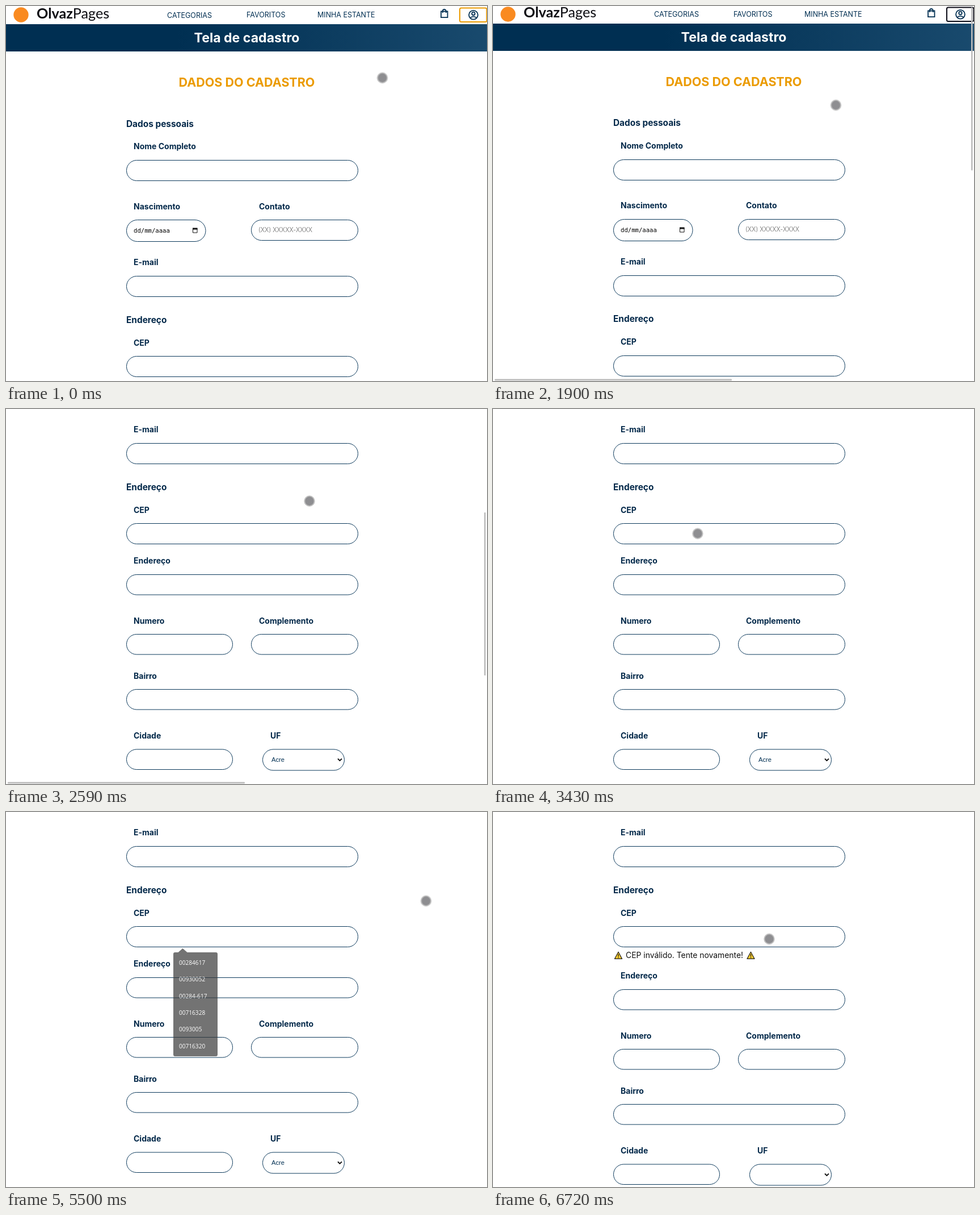
An HTML page that plays this animation: 848x660 px, repeating every 8000 ms.

```html
<!DOCTYPE html>
<html lang="pt-BR">
<head>
<meta charset="utf-8">
<title>Tela de cadastro</title>
<style>
  html, body { margin: 0; width: 100%; height: 100%; overflow: hidden; background: #fff; }
  svg { display: block; width: 848px; height: 660px; font-family: Inter, sans-serif; fill: #002f52; }

  .brand { font: 25.2px Lato, sans-serif; fill: #0d0d12; }
  .brand .bold { font-weight: 700; }
  .nav { font-size: 12.5px; font-weight: 400; }
  .banner { font-size: 23.1px; font-weight: 700; fill: #fff; text-anchor: middle; }
  .title { font-size: 21.5px; font-weight: 700; fill: #eb9b00; text-anchor: middle; }
  .section { font-size: 15.4px; font-weight: 700; fill: #04294a; }
  .label { font-size: 14px; font-weight: 700; fill: #04294a; }
  .hint { font-size: 11px; font-weight: 300; fill: #666; }
  .date { font: 10.6px "DejaVu Sans Mono", monospace; fill: #000; }
  .option { font: 11.2px "Liberation Sans", Arial, sans-serif; }
  .notice { font-size: 13.9px; font-weight: 400; fill: #111; }
  .item { font-size: 14.2px; font-weight: 300; }
  .item.on { font-size: 13.4px; font-weight: 700; fill: #eb9b00; }
  .tips { font: 10.1px "Open Sans", sans-serif; fill: #fff; }
  .field { fill: #fff; stroke: #0d3a5c; }
  .line { fill: none; stroke: #002f52; stroke-width: 1.8; }
  .bar { fill: #bcbcbc; }

  /* every animation shares one 8 s timeline */
  .page, .bar, .frame, .account, .menu, .lower, .notice-row, .acre, .popup, .cursor, .dot {
    animation: 8s linear infinite;
  }
  .frame, .account, .menu, .lower, .notice-row, .acre, .dot { animation-timing-function: step-end; }

  .page { animation-name: scroll; }
  @keyframes scroll {
    0%, 23.6% { transform: translateY(0); }
    23.75% { transform: translateY(-1px); animation-timing-function: cubic-bezier(.3, 0, .5, 1); }
    30.5%, 100% { transform: translateY(-415px); }
  }

  .bar.v { animation-name: thumb; }
  @keyframes thumb {
    0%, 10.8% { transform: translateY(0); opacity: 0; }
    10.87%, 23.75% { transform: translateY(0); opacity: 1; }
    23.75% { animation-timing-function: cubic-bezier(.3, 0, .5, 1); }
    30.5%, 35% { transform: translateY(180px); opacity: 1; }
    37.5%, 100% { transform: translateY(180px); opacity: 0; }
  }
  .bar.h { animation-name: track; }
  @keyframes track {
    0%, 10.8% { opacity: 0; }
    10.87% { opacity: 1; }
    12.6%, 23.6% { opacity: 0; }
    23.7%, 35% { opacity: 1; }
    37.5%, 100% { opacity: 0; }
  }

  .frame { animation-name: frame; }
  @keyframes frame {
    0% { fill: #fff; stroke: #eb9b00; }
    10.875% { fill: #002f52; stroke: #06101c; }
    17.625%, 100% { fill: #fff; stroke: #0b0b16; }
  }
  .account { animation-name: account; }
  @keyframes account {
    0% { stroke: #002f52; }
    10.875% { stroke: #fff; }
    17.625%, 100% { stroke: #002f52; }
  }
  .menu { animation-name: menu; }
  @keyframes menu {
    0% { visibility: hidden; }
    10.875% { visibility: visible; }
    17.625%, 100% { visibility: hidden; }
  }

  .lower { animation-name: lower; }
  @keyframes lower {
    0% { transform: translateY(0); }
    76.375%, 100% { transform: translateY(21px); }
  }
  .notice-row { animation-name: show; }
  @keyframes show {
    0% { visibility: hidden; }
    76.375%, 100% { visibility: visible; }
  }
  .acre { animation-name: hide; }
  @keyframes hide {
    0% { visibility: visible; }
    76.375%, 100% { visibility: hidden; }
  }

  .popup { animation-name: popup; }
  @keyframes popup {
    0%, 60.3% { opacity: 0; }
    61.9%, 67.8% { opacity: 1; }
    68.75% { opacity: .72; }
    70.3%, 100% { opacity: 0; }
  }

  .cursor { animation-name: move; animation-timing-function: ease-in-out; }
  @keyframes move {
    0% { transform: translate(663.5px, 126.5px); }
    8.25%, 17.5% { transform: translate(816px, 21px); }
    23.75% { transform: translate(604.5px, 174.5px); }
    32.375% { transform: translate(535px, 162px); animation-timing-function: ease-in; }
    37.75% { transform: translate(430px, 191px); animation-timing-function: ease-out; }
    43.625%, 61.125% { transform: translate(359px, 220px); }
    64.625%, 75.5% { transform: translate(740.5px, 156.5px); }
    84%, 100% { transform: translate(487px, 223.5px); }
  }
  .dot { stroke-width: 1.8; animation-name: press; }
  @keyframes press {
    0%, 11.75%, 17.625%, 61.125%, 67.875%, 100% {
      fill: rgba(50, 50, 54, .55); stroke: rgba(90, 90, 90, .38);
    }
    10%, 16.75%, 59.5%, 67% {
      fill: rgba(170, 165, 0, .7); stroke: rgba(220, 215, 20, .8);
    }
  }
</style>
</head>
<body>
<svg viewBox="0 0 848 660">
  <defs>
    <linearGradient id="sea" gradientUnits="userSpaceOnUse" x1="301" y1="0" x2="1402" y2="0">
      <stop offset="0" stop-color="#002f52"/>
      <stop offset="1" stop-color="#326589"/>
    </linearGradient>
    <g id="warn">
      <path d="M7.5 1.2 14 13.4H1Z" fill="#fccf2e" stroke="#26221c" stroke-width="1.2" stroke-linejoin="round"/>
      <path d="M7.5 5v4.4M7.5 10.6v1.4" stroke="#26221c" stroke-width="1.4"/>
    </g>
  </defs>

  <g class="page">
    <!-- header -->
    <circle cx="26.5" cy="15.5" r="13.2" fill="#f98a20"/>
    <text class="brand" x="54" y="21.5"><tspan class="bold">Olvaz</tspan>Pages</text>
    <g class="nav">
      <text x="284" y="20.5">CATEGORIAS</text>
      <text x="424" y="20">FAVORITOS</text>
      <text x="549" y="20">MINHA ESTANTE</text>
    </g>
    <path class="line" d="M767 9.5h11.5v10.7h-11.5zM769.8 12V9a3 3 0 0 1 6 0v3"/>
    <rect class="frame" x="800" y="3.5" width="47.5" height="24.5" rx="2.5" stroke-width="2"/>
    <g class="line account">
      <circle cx="824" cy="15.7" r="7.9"/>
      <circle cx="824" cy="13.4" r="2.7"/>
      <path d="M818.4 21c3-3.2 8.2-3.2 11.2 0"/>
    </g>
    <rect y="32" width="848" height="48" fill="url(#sea)"/>
    <text class="banner" x="424.5" y="64">Tela de cadastro</text>
    <g class="menu">
      <rect x="730" y="32" width="118" height="160" fill="#fff"/>
      <text class="item on" x="743" y="56.5">Meu Perfil</text>
      <text class="item" x="743" y="96.5">Minha conta</text>
      <text class="item" x="743" y="136.5">Meus pedidos</text>
      <text class="item" x="743" y="176">Sair</text>
    </g>

    <!-- personal data -->
    <text class="title" x="424.5" y="142">DADOS DO CADASTRO</text>
    <text class="section" x="212" y="212.5">Dados pessoais</text>
    <text class="label" x="225" y="252">Nome Completo</text>
    <rect class="field" x="212.5" y="271.5" width="408" height="36" rx="18"/>
    <text class="label" x="225" y="357.5">Nascimento</text>
    <rect class="field" x="212.5" y="376.5" width="139.5" height="38" rx="19"/>
    <text class="date" x="225" y="399">dd/mm/aaaa</text>
    <path d="M329.5 391.5h7.5v7.5h-7.5z" fill="none" stroke="#111"/>
    <path d="M329 390.5h8.5v3h-8.5z" fill="#111"/>
    <text class="label" x="446" y="357.5">Contato</text>
    <rect class="field" x="432.5" y="376.5" width="188" height="36" rx="18"/>
    <text class="hint" x="445" y="398">(XX) XXXXX-XXXX</text>
    <text class="label" x="225" y="456.3">E-mail</text>
    <rect class="field" x="212.5" y="475.5" width="408" height="36" rx="18"/>

    <!-- address -->
    <text class="section" x="212" y="557.5">Endereço</text>
    <text class="label" x="225" y="597.5">CEP</text>
    <rect class="field" x="212.5" y="616.5" width="408" height="36" rx="18"/>
    <g class="notice-row">
      <use href="#warn" x="213.5" y="660"/>
      <text class="notice" x="234" y="671.5">CEP inválido. Tente novamente!</text>
      <use href="#warn" x="447" y="660"/>
    </g>
    <g class="lower">
      <text class="label" x="225" y="687">Endereço</text>
      <rect class="field" x="212.5" y="706.5" width="408" height="35.5" rx="17.7"/>
      <text class="label" x="225" y="792.5">Numero</text>
      <rect class="field" x="212.5" y="811.5" width="187" height="35.5" rx="17.7"/>
      <text class="label" x="446" y="792.5">Complemento</text>
      <rect class="field" x="432.5" y="811.5" width="188" height="35.5" rx="17.7"/>
      <text class="label" x="225" y="889.5">Bairro</text>
      <rect class="field" x="212.5" y="908.5" width="408" height="35.5" rx="17.7"/>
      <text class="label" x="225" y="995">Cidade</text>
      <rect class="field" x="212.5" y="1014" width="187" height="35.5" rx="17.7"/>
      <text class="label" x="466" y="995">UF</text>
      <rect class="field" x="452.5" y="1014" width="144" height="37" rx="18.5"/>
      <text class="option acre" x="468" y="1036">Acre</text>
      <path d="M585 1030.5l3.5 3.5 3.5-3.5" fill="none" stroke="#111" stroke-width="1.8"/>
    </g>
  </g>

  <g class="popup">
    <path d="M303 247.5l8.5-7.5 8.5 7.5z" fill="#3b3b3b"/>
    <rect x="295" y="247" width="78" height="183" rx="3" fill="#3b3b3b"/>
    <g class="tips">
      <text x="305" y="269">00284617</text>
      <text x="305" y="298.4">00930052</text>
      <text x="305" y="327.7">00284-617</text>
      <text x="305" y="357">00716328</text>
      <text x="305" y="386.4">0093005</text>
      <text x="305" y="415.7">00716320</text>
    </g>
  </g>

  <rect class="bar v" x="843" y="2" width="2.6" height="287" rx="1"/>
  <rect class="bar h" x="3" y="656.6" width="418" height="2.6" rx="1"/>
  <g class="cursor">
    <g class="dot">
      <circle r="7.9" stroke="none"/>
      <circle r="8.8" fill="none"/>
    </g>
  </g>
</svg>
</body>
</html>
```
